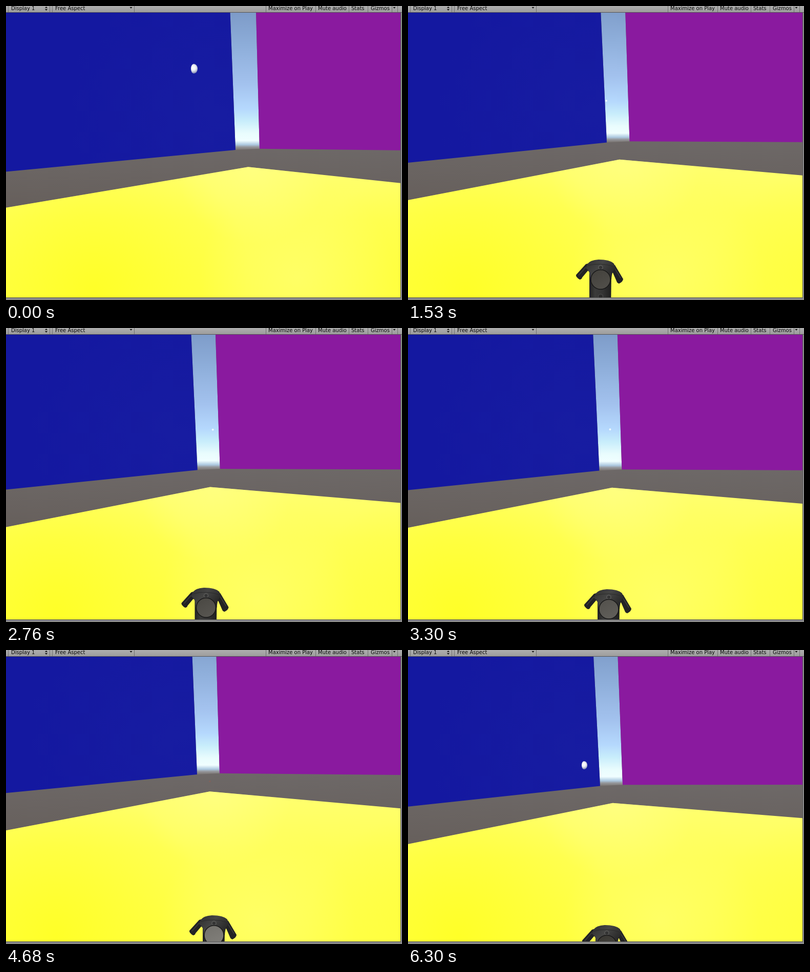
Write an HTML page with a canvas that moves like this. It is 773x574 px and loops after 6.37 s.

```html
<!DOCTYPE html>
<html lang="en">
<head>
<meta charset="utf-8">
<title>Room view</title>
<style>
html, body { margin: 0; width: 100%; height: 100%; overflow: hidden; background: #8a8a8a; }
canvas { display: block; }
</style>
</head>
<body>
<canvas id="stage" width="773" height="574"></canvas>
<script>
const ctx = document.getElementById('stage').getContext('2d');
const LOOP = 6370, STEP = 76.75, LAST = 82;
const VIEW = { left: 0, top: 13, right: 770, bottom: 569 };

// All movement shares these beats; travel() adds one move per beat to a start value.
const BEATS = [0, 9, 20, 29, 43, 61, LAST];
let step = 0;
const progress = i => Math.min(1, Math.max(0, (step - BEATS[i]) / (BEATS[i + 1] - BEATS[i])));
const travel = (start, ...moves) => moves.reduce((sum, move, i) => sum + move * progress(i), start);

function poly(fill, ...points) {
  ctx.beginPath();
  points.forEach(([x, y]) => ctx.lineTo(x, y));
  ctx.closePath();
  ctx.fillStyle = fill;
  ctx.fill();
}

function addStops(gradient, stops) {
  stops.forEach(([at, color]) => gradient.addColorStop(at, color));
  return gradient;
}
const linear = (x0, y0, x1, y1, ...stops) => addStops(ctx.createLinearGradient(x0, y0, x1, y1), stops);
const radial = (x, y, r, ...stops) => addStops(ctx.createRadialGradient(x, y, 0, x, y, r), stops);

function ellipse(x, y, rx, ry, fill, stroke) {
  ctx.beginPath();
  ctx.ellipse(x, y, rx, ry, 0, 0, Math.PI * 2);
  ctx.fillStyle = fill;
  ctx.fill();
  if (stroke) { ctx.strokeStyle = stroke; ctx.lineWidth = 1.5; ctx.stroke(); }
}

// The view pans, pitches and rolls; every edge follows from the foot of the gap.
function lookAround() {
  const x = travel(448, -4, -56, -14, -.5, -.5, 2);
  const y = travel(281, -12.5, -2, 9.5, 2.5, -35.5, 22.5);
  const roll = travel(.011, -.011, .004, -.001, .001, .005, -.01);
  const pan = x - 374, { top, right } = VIEW;
  const far = { x: x + 44 + pan * .04, y: y - 2.2 };
  const apex = { x: x + 24.7, y: y + 33.3 };
  return {
    x, y, far, apex,
    gapTop: x - (.05 - roll) * (y - top),
    farTop: far.x - (.037 - roll) * (far.y - top),
    blueY: y + (.106 - roll) * x,
    purpleY: far.y + roll * (right - far.x),
    leftY: apex.y + (.2 - pan * .00028 - roll) * apex.x,
    rightY: apex.y + (.08 + pan * .0002 + roll) * (right - apex.x)
  };
}

function drawRoom({ x, y, far, apex, gapTop, farTop, blueY, purpleY, leftY, rightY }) {
  const { left, top, right, bottom } = VIEW;

  ctx.fillStyle = linear(0, y, 0, bottom, [0, '#6d6867'], [.4, '#665f5b']);
  ctx.fillRect(left, top, right, bottom - top);

  const sky = linear(0, y - 268, 0, y,
    [0, '#7d9bc8'], [.25, '#8eaeda'], [.52, '#a3c2ee'], [.7, '#b5d8fd'],
    [.79, '#c8edfb'], [.88, '#e9fcfd'], [.932, '#f0feff'],
    [.962, '#acc8e0'], [.978, '#95979b'], [1, '#77716d']);
  poly(sky, [gapTop, top], [farTop, top], [far.x, far.y], [x, y]);

  const blue = radial(x - 30, y - 70, 300, [0, '#171ca1'], [1, '#1418a0']);
  poly(blue, [left, top], [gapTop, top], [x, y], [left, blueY]);
  poly('#8a1a9f', [farTop, top], [right, top], [right, purpleY], [far.x, far.y]);

  const platform = [[left, leftY], [apex.x, apex.y], [right, rightY], [right, bottom], [left, bottom]];
  poly(linear(0, apex.y, 0, bottom, [0, '#ffff70'], [.4, '#ffff57'], [1, '#ffff48']), ...platform);
  const glow = (cx, cy, r, rgb, alpha) =>
    poly(radial(cx, cy, r, [0, `rgba(${rgb},${alpha})`], [1, `rgba(${rgb},0)`]), ...platform);
  glow(apex.x - 300, 560, 310, '255,255,34', .85);
  glow(right + 20, 530, 200, '255,255,54', .6);
  glow(apex.x + 95, 530, 190, '255,255,114', .65);
  glow(apex.x + 10, apex.y, 150, '255,255,138', .6);
}

function drawPointer({ x: footX, y: footY, gapTop }) {
  const x = travel(367.5, -20, 39.5, 26, -18.5, 3.5, -53.5);
  const y = travel(122.5, 35.5, 27, 14, -1, 58.5, -31.5);
  const edge = gapTop + (footX - gapTop) * (y - VIEW.top) / (footY - VIEW.top);
  if (y > footY) return ellipse(x, y, 1.8, 1.8, '#81625c');
  if (x > edge) return ellipse(x, y, 2, 2, '#eefaff');
  const scale = 1 - .15 * step / LAST;
  ctx.save();
  ctx.translate(x, y);
  ctx.scale(scale, scale);
  ctx.beginPath();
  ctx.ellipse(-1, 0, 5.5, 9.5, 0, Math.PI / 2, Math.PI * 1.5);
  ctx.ellipse(-1, 0, 7.5, 9.5, 0, -Math.PI / 2, Math.PI / 2);
  ctx.fillStyle = radial(-2, -2, 12, [0, '#fff'], [.4, '#f1f3f7'], [.7, '#b8bdd2'], [1, '#646aa6']);
  ctx.fill();
  ctx.restore();
}

// Shapes are placed around the centre of the round pad.
const arms = new Path2D(
  'M-22 -32 L-29 -30 L-48 -9 Q-49 -5 -41 0 Q-37 0 -36 -4 L-25 -17 L-15 -14Z' +
  'M21 -32 L28 -28 L44 -1 Q44 4 36 8 Q32 7 31 3 L24 -13 L14 -14Z');
const armRidges = new Path2D('M-29 -24 L-43 -8 M28 -21 L39 -3');
const head = new Path2D('M-26 -30 Q-21 -38 -4 -39 Q18 -39 26 -31 L29 -21 Q22 -18 21 0 L-20 0 Q-20 -17 -29 -22Z');
const brow = new Path2D('M-26 -27 Q0 -34 27 -25');

function drawHand() {
  const light = travel(68, 2, 6, -3, 19, 32, -58);
  const tone = d => `rgb(${light + d},${light + d - 2},${light + d - 7})`;
  ctx.save();
  ctx.translate(travel(395, -7, -12, 13, 3, 14, -18), travel(618, -106, 22, 9, 6, 8, 19));
  ctx.rotate(travel(-5, 0, 5) * Math.PI / 180);

  const body = linear(-22, 0, 22, 0, [0, '#222'], [.25, '#3b3b3a'], [.6, '#333'], [1, '#1d1d1d']);
  poly(body, [-22, -14], [21, -14], [20, 70], [-22, 70]);
  ellipse(0, 33, 4.5, 4.5, '#292929', '#454545');

  ctx.fillStyle = '#222224';
  ctx.fill(arms);
  ctx.strokeStyle = '#3c3c3c';
  ctx.lineWidth = 1.5;
  ctx.stroke(armRidges);
  ctx.fillStyle = linear(-24, -36, 22, 0, [0, '#333'], [.4, '#454544'], [1, '#222']);
  ctx.fill(head);
  ctx.lineWidth = 1;
  ctx.strokeStyle = '#2b2b2b';
  ctx.stroke(brow);

  ellipse(0, -23.5, 4, 4, '#343434', '#5b5b59');
  ellipse(0, 0, 19, 19, linear(-10, -18, 10, 18, [0, tone(-8)], [1, tone(5)]), '#181818');
  ctx.restore();
}

function rect(color, x, y, w, h) {
  ctx.fillStyle = color;
  ctx.fillRect(x, y, w, h);
}

function drawFrame() {
  rect(linear(0, 0, 0, 12, [0, '#aeaeae'], [1, '#9d9d9d']), 0, 0, 773, 12);
  rect('#555', 0, 12, 773, 1);
  for (const x of [4, 85, 90, 250, 507, 604, 669, 706, 753, 764]) rect('#707070', x, 0, 1, 12);
  ctx.font = '10px "DejaVu Sans", Verdana, sans-serif';
  ctx.fillStyle = '#080808';
  const labels = [['Display 1', 10], ['Free Aspect', 96], ['Maximize on Play', 512],
    ['Mute audio', 609], ['Stats', 674], ['Gizmos', 712]];
  labels.forEach(([text, x]) => ctx.fillText(text, x, 8));
  for (const x of [244, 758]) poly('#111', [x - 2.5, 2], [x + 2.5, 2], [x, 5]);
  poly('#111', [76, 4], [81, 4], [78.5, 1]);
  poly('#111', [76, 6], [81, 6], [78.5, 9]);
  rect('#555', 770, 13, 1, 557);
  rect('#8c8c8c', 771, 13, 2, 561);
  rect('#555', 0, 569, 771, 1);
  rect('#8a8a8a', 0, 570, 773, 4);
}

function render() {
  step = Math.min(LAST, Math.floor(performance.now() % LOOP / STEP + .1));
  const room = lookAround();
  ctx.save();
  ctx.beginPath();
  ctx.rect(VIEW.left, VIEW.top, VIEW.right, VIEW.bottom - VIEW.top);
  ctx.clip();
  drawRoom(room);
  drawPointer(room);
  drawHand();
  ctx.restore();
  drawFrame();
  requestAnimationFrame(render);
}
render();
</script>
</body>
</html>
```
